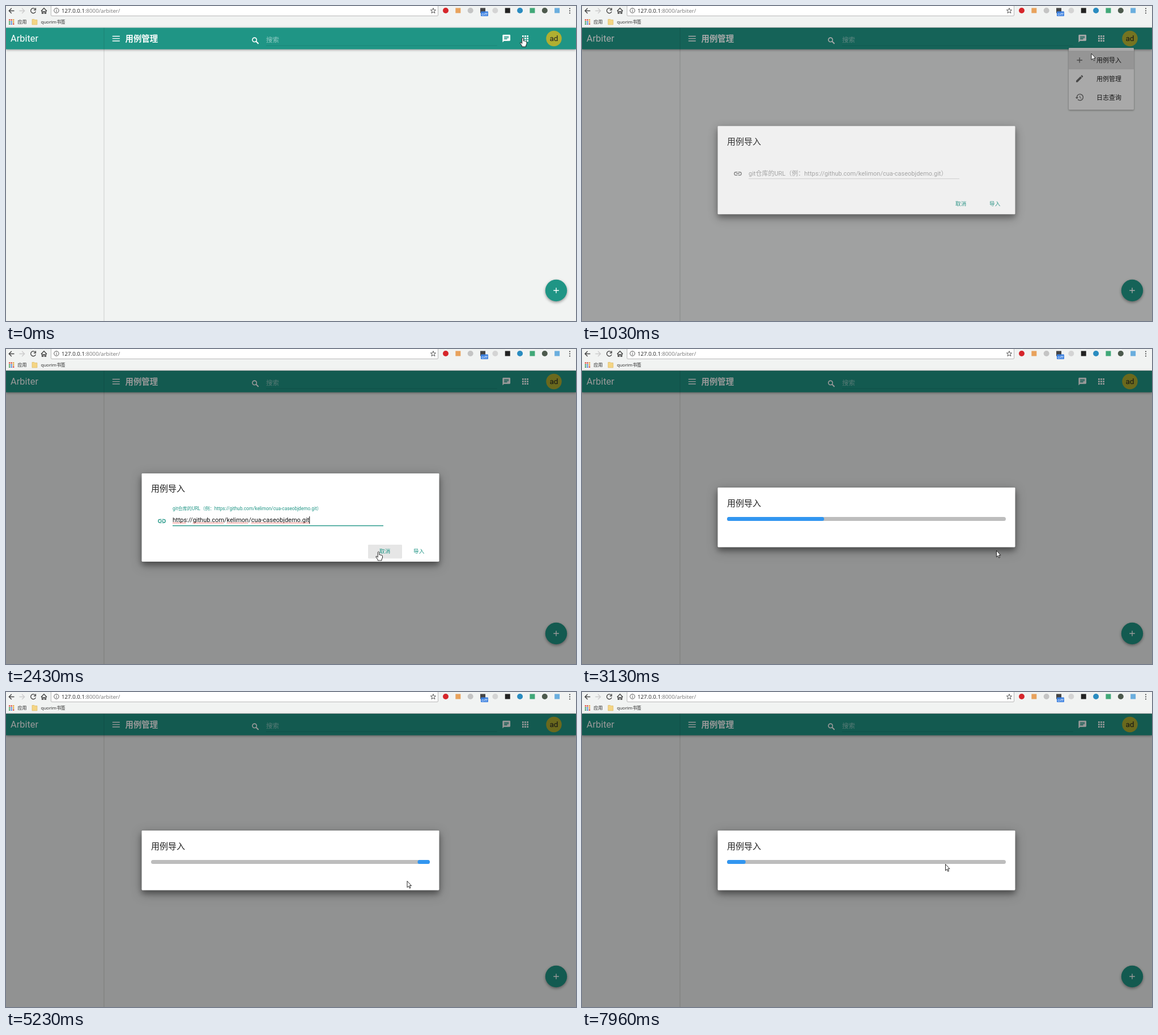
Write an HTML page that moves like this. It is 1006x557 px and loops after 8000 ms.

```html
<!DOCTYPE html>
<html lang="zh">
<head>
<meta charset="utf-8">
<title>Arbiter</title>
<style>
html, body { margin: 0; width: 100%; height: 100%; overflow: hidden; background: #f1f3f2; }
svg { display: block; width: 1006px; height: 557px; }
text { font-family: Roboto, "Noto Sans CJK SC", "Noto Sans CJK", sans-serif; font-size: 11px; white-space: pre; }
.ui { font-family: "Open Sans", "Noto Sans CJK SC", "Noto Sans CJK", sans-serif; font-size: 8px; fill: #222; }
.line { fill: none; stroke: #444; stroke-width: 1.4; }
.head { filter: drop-shadow(0 1.5px 2px rgba(0,0,0,.4)); }
.fab { filter: drop-shadow(0 2px 2.5px rgba(0,0,0,.4)); }
.pop { filter: drop-shadow(0 1px 1.5px rgba(0,0,0,.4)); }
.card { fill: #fff; filter: drop-shadow(0 6px 5px rgba(0,0,0,.3)) drop-shadow(0 4px 9px rgba(0,0,0,.3)); }
.title { font-size: 15px; font-weight: 300; fill: #212121; }
.btn { font-size: 9.6px; fill: #1f9585; text-anchor: middle; }
</style>
</head>
<body>
<svg viewBox="0 0 1006 557">
  <defs>
    <path id="add" d="M19 13h-6v6h-2v-6H5v-2h6V5h2v6h6z"/>
    <clipPath id="track"><rect x="256" y="297" width="492" height="7" rx="3.5"/></clipPath>
  </defs>
  <rect width="1006" height="557" fill="#f1f3f2"/>

  <!-- browser bar -->
  <rect x="79.5" y="-3" width="683" height="20.5" rx="1.5" fill="#fff" stroke="#b8b8b8"/>
  <path class="line" d="M14.5 8.5H5.5M9.8 4L5.3 8.5L9.8 13"/>
  <path class="line" style="stroke:#ccc" d="M23.5 8.5H32.5M28.2 4L32.7 8.5L28.2 13"/>
  <path class="line" d="M51.4 5.4A4.4 4.4 0 1 0 52.3 9.6M52.4 3.6V7H49"/>
  <path class="line" d="M62 9L67 3.8L72 9M63.6 8V13H65.6V9.6H68.4V13H70.4V8"/>
  <circle cx="89" cy="8" r="4.2" fill="none" stroke="#555"/>
  <path stroke="#555" d="M89 7.3V10.6M89 5.2V6.3"/>
  <text class="ui" x="98" y="11.7" style="font-size:9.7px">127.0.0.1<tspan fill="#777">:8000/arbiter/</tspan></text>
  <path fill="none" stroke="#555" d="M754 3.6L755.3 7H758.6L756 9.2L757 12.6L754 10.6L751 12.6L752 9.2L749.4 7H752.7Z"/>
  <g id="addons"></g>
  <rect x="838" y="9.5" width="13" height="8.5" rx="1" fill="#3b80e0"/>
  <text class="ui" x="844.5" y="16.8" text-anchor="middle" style="fill:#fff">off</text>
  <g fill="#444"><circle cx="995" cy="4.5" r="1.1"/><circle cx="995" cy="8.5" r="1.1"/><circle cx="995" cy="12.5" r="1.1"/></g>
  <g id="apps"></g>
  <text class="ui" x="20.5" y="31">应用</text>
  <path d="M46 23.5H50L51 24.5H55V33H46Z" fill="#f4d584" stroke="#d9b45c" stroke-width=".6"/>
  <text class="ui" x="61.5" y="31">quorim书签</text>

  <!-- page -->
  <rect x="172.3" y="76" width="1.4" height="481" fill="#d6d8d7"/>
  <rect class="head" y="38.5" width="1006" height="38" fill="#1f9585"/>
  <rect y="30" width="0" height="0"/>
  <rect x="172.5" y="38.5" width="1" height="38" fill="#000" opacity=".13"/>
  <text x="8" y="63" fill="#fff" style="font-size:16.4px">Arbiter</text>
  <path d="M187.8 53.5H200.8M187.8 57.6H200.8M187.8 61.7H200.8" stroke="#fff" stroke-width="1.4"/>
  <text x="210.5" y="63.4" fill="#fff" style="font-size:14.4px;font-weight:700">用例管理</text>
  <circle cx="438.6" cy="59.8" r="3.7" fill="none" stroke="#fff" stroke-width="1.6"/>
  <path d="M441.2 62.4L445.6 66.8" stroke="#fff" stroke-width="2"/>
  <text x="459" y="63.5" fill="#fff" fill-opacity=".5" style="font-size:11.5px">搜索</text>
  <rect x="459" y="69.6" width="408" height=".8" fill="#000" opacity=".14"/>
  <path transform="translate(875 49.3) scale(.685)" fill="#fff" d="M20 2H4c-1.1 0-2 .9-2 2v18l4-4h14c1.1 0 2-.9 2-2V4c0-1.100-.9-2-2-2zM6 9h12v2H6zm8 5H6v-2h8zm4-6H6V6h12z"/>
  <g id="grid" fill="#fff"></g>
  <circle cx="967" cy="57.5" r="13.7" fill="#b0af31"/>
  <text x="967" y="62" text-anchor="middle" fill="#212121" style="font-size:13.7px">ad</text>
  <circle class="fab" cx="971" cy="503" r="19.2" fill="#1f9585"/>
  <use href="#add" transform="translate(962.8 494.8) scale(.685)" fill="#fff"/>

  <!-- menu -->
  <g id="menu">
    <rect class="pop" x="859" y="74" width="115" height="109.500" rx="1.4" fill="#fff"/>
    <rect id="row" x="859" y="79" width="115" height="33" fill="#e0e0e0"/>
    <g fill="#6d6d6d">
      <use href="#add" transform="translate(870 87.500) scale(.685)"/>
      <path transform="translate(870 120.300) scale(.685)" d="M3 17.250V21h3.750L17.800 9.940l-3.750-3.750zM20.700 7c.4-.4.4-1 0-1.400l-2.300-2.300c-.4-.4-1-.4-1.400 0l-1.900 1.800 3.800 3.800z"/>
      <path transform="translate(870 153.200) scale(.685)" d="M13 3a9 9 0 0 0-9 9H1l4 4 4-4H6a7 7 0 1 1 2.100 4.900l-1.400 1.500A9 9 0 1 0 13 3zm-1 5v5l4.300 2.500.7-1.200-3.500-2.100V8z"/>
    </g>
    <g fill="#212121">
      <text x="908" y="100">用例导入</text>
      <text x="908" y="132.600">用例管理</text>
      <text x="908" y="165.500">日志查询</text>
    </g>
  </g>

  <rect id="shade" y="38" width="1006" height="519" opacity="0"/>

  <!-- form dialog -->
  <g id="form">
    <rect class="card" x="239.500" y="220" width="525" height="156" rx="1.4"/>
    <text class="title" x="256" y="252.300">用例导入</text>
    <path id="link" transform="translate(266.800 296) scale(.685)" d="M3.900 12c0-1.700 1.400-3.100 3.100-3.100h4V7H7a5 5 0 0 0 0 10h4v-1.900H7c-1.700 0-3.100-1.400-3.100-3.100zM8 13h8v-2H8zm9-6h-4v1.900h4a3.100 3.100 0 0 1 0 6.200h-4V17h4a5 5 0 0 0 0-10z"/>
    <text id="label">git仓库的URL（例：https://github.com/kelimon/cua-caseobjdemo.git）</text>
    <g id="value">
      <text id="url" x="294" y="306.300" fill="#111">https://github.com/kelimon/cua-caseobjdemo.git</text>
      <path id="wavy" fill="none" stroke="#f0453a" stroke-width=".8"/>
    </g>
    <rect id="caret" y="296" width="1" height="13"/>
    <rect id="rule" x="294" width="372"/>
    <rect id="no" x="639" y="346" width="60" height="24.500" rx="1.4" fill="#e6e6e6"/>
    <rect id="yes" x="699" y="346" width="60" height="24.500" rx="1.4" fill="#e6e6e6"/>
    <text class="btn" x="668.700" y="361">取消</text>
    <text class="btn" x="728.700" y="361">导入</text>
  </g>

  <!-- progress dialog -->
  <g id="busy">
    <rect class="card" x="239.500" y="245" width="525" height="105.500" rx="1.4"/>
    <text class="title" x="256" y="277.600">用例导入</text>
    <g clip-path="url(#track)">
      <rect x="256" y="297" width="492" height="7" fill="#bdbdbd"/>
      <rect id="bar" y="297" width="196.800" height="7" rx="3.5" fill="#3296f0"/>
    </g>
  </g>

  <!-- pointer -->
  <g id="pointer" fill="#fff" stroke="#111" stroke-width=".9" stroke-linejoin="round">
    <path id="arrow" d="M.5 .5V11.800L3.100 9.400L4.800 13.300L6.500 12.500L4.800 8.700H8Z"/>
    <path id="hand" d="M-1.300 1.300Q0-.8 1.300 1.300V6Q2.500 5 3.400 6.400Q4.700 5.600 5.400 7Q7 6.500 7 8.500V11L5.600 14V16H-1.400V14.400L-4.400 10Q-5 8-3 8.600L-1.300 10.400Z"/>
    <path id="beam" fill="none" d="M-2-6H2M0-6V6M-2 6H2"/>
  </g>
</svg>
<script>
const LOOP = 8000, STEP = 78.04;
const OPEN = 156, MODAL = 850, FOCUS = 1730, PASTE = 2050, IMPORT = 2834, CYCLE = 833;
const $ = id => document.getElementById(id);
const show = (id, on) => { $(id).style.display = on ? '' : 'none'; };
const set = (id, attrs) => { for (const k in attrs) $(id).setAttribute(k, attrs[k]); };
const clamp = v => Math.min(1, Math.max(0, v));
const mix = (a, b, p) => a + (b - a) * p;

function bezier(x1, y1, x2, y2) {
  const at = (a, b, s) => 3 * (1 - s) * (1 - s) * s * a + 3 * (1 - s) * s * s * b + s ** 3;
  return x => {
    let lo = 0, hi = 1;
    for (let i = 0; i < 24; i++) {
      const mid = (lo + hi) / 2;
      if (at(x1, x2, mid) < x) lo = mid; else hi = mid;
    }
    return at(y1, y2, lo);
  };
}
const ease = bezier(.25, .1, .25, 1);
const easeInOut = bezier(.42, 0, .58, 1);
const easeOut = bezier(.05, .03, .35, 1);

// time, x, y of the pointer's hot spot
const route = [
  [0, 912, 56], [100, 912, 56], [170, 913, 52], [390, 911, 56], [620, 898.5, 83.5],
  [1200, 898.5, 83.5], [1680, 560, 299], [2150, 560, 299], [2400, 657.5, 358],
  [2500, 657.5, 358], [2730, 731, 356], [4200, 731, 356], [5000, 716, 351],
  [5220, 708, 334], [5840, 674, 319], [6320, 655, 302], [6700, 649, 295],
  [6785, 648, 300], [7300, 641, 304], [LOOP, 641, 304]
];
function pointerAt(t) {
  const i = route.findIndex(k => k[0] > t), a = route[i - 1], b = route[i];
  const p = (t - a[0]) / (b[0] - a[0]);
  return [mix(a[1], b[1], p), mix(a[2], b[2], p)];
}

function squares(id, x, y, pitch, size, colors) {
  for (let i = 0; i < 9; i++) {
    $(id).innerHTML += `<rect x="${x + i % 3 * pitch}" y="${y + Math.floor(i / 3) * pitch}"
      width="${size}" height="${size}" fill="${colors[i % colors.length]}"/>`;
  }
}
squares('grid', 911, 52, 4.11, 2.74, ['#fff']);
squares('apps', 5, 23.5, 3.5, 2.4, ['#d9483b', '#d9483b', '#e0a030', '#3f9c5a', '#4a7fd8', '#e0a030', '#3f9c5a', '#4a7fd8']);

const addons = ['#d6262b', '#e8a25c', '#c4c4c4', '#444', '#d4d4d4', '#222', '#2a8cc0', '#41a878', '#4d5a4d', '#6aaede'];
addons.forEach((color, i) => {
  const x = 776 + i * 21.85;
  $('addons').innerHTML += i % 2
    ? `<rect x="${x - 4.5}" y="3.5" width="9" height="9" fill="${color}"/>`
    : `<circle cx="${x}" cy="8" r="5" fill="${color}"/>`;
});

const url = $('url');
const urlEnd = 294 + url.getComputedTextLength();
let waves = '';
for (const word of ['https', 'github.com', 'kelimon', 'cua-caseobjdemo.git']) {
  const start = url.textContent.indexOf(word);
  const x0 = url.getStartPositionOfChar(start).x;
  const x1 = url.getEndPositionOfChar(start + word.length - 1).x;
  waves += `M${x0} 308.3`;
  for (let x = x0 + 1.4, up = 1; x < x1; x += 1.4, up = 1 - up) waves += `L${x} ${308.3 - up * 1.3}`;
}
set('wavy', { d: waves });

function draw(t) {
  const [x, y] = pointerAt(t);
  const inForm = t >= MODAL && t < IMPORT, focused = t >= FOCUS;

  const grow = easeOut(clamp((t - OPEN) / 200)), scale = mix(.7, 1, grow);
  show('menu', t >= OPEN && t < FOCUS);
  set('menu', { opacity: grow, transform: `translate(916.5 74) scale(${scale}) translate(-916.5 -74)` });
  show('row', t >= 500);

  const fade = ease(clamp((t - MODAL) / 300));
  set('shade', { opacity: .4 * fade });
  show('form', inForm);
  set('form', { opacity: fade, transform: `translate(0 ${-50 * (1 - fade)})` });

  const lift = focused ? ease(clamp((t - FOCUS) / 300)) : 0;
  set('label', {
    transform: `translate(294 ${mix(307.3, 284.6, lift)}) scale(${mix(1, .75, lift)})`,
    fill: focused ? '#1f9585' : '#a6a6a6'
  });
  set('link', { fill: focused ? '#1f9585' : '#7d7d7d' });
  set('rule', { y: focused ? 311.8 : 312.6, height: focused ? 1.4 : .7, fill: focused ? '#1f9585' : '#c4c4c4' });
  show('value', t >= PASTE);
  show('caret', focused);
  set('caret', { x: t >= PASTE ? urlEnd : 294 });
  const hover = left => inForm && x >= left && x < left + 60 && y > 346 && y < 370;
  show('no', hover(639));
  show('yes', hover(699));

  show('busy', t >= IMPORT);
  const phase = Math.max(0, t - IMPORT) / CYCLE % 1;
  set('bar', { x: 256 + 492 * mix(-.4, 1, easeInOut(phase)) });

  const beam = t > 1640 && t < 2200;
  const hand = t < 775 || hover(639) || hover(699);
  show('beam', beam);
  show('hand', hand);
  show('arrow', !beam && !hand);
  set('pointer', { transform: `translate(${x} ${y})` });
}

const begin = performance.now();
function tick() {
  const t = (performance.now() - begin) % LOOP;
  draw(Math.floor((t + 10) / STEP) * STEP);
  requestAnimationFrame(tick);
}
tick();
</script>
</body>
</html>
```
